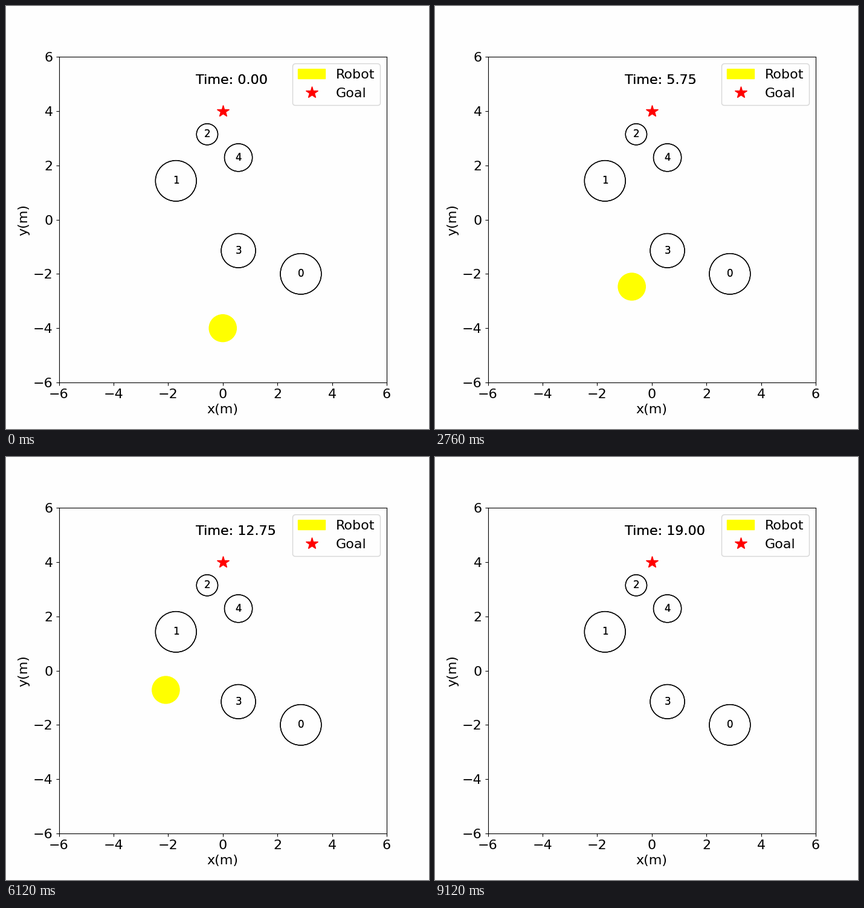
A matplotlib script that plays this animation: 700 px wide and 700 px high, repeating every 9240 ms.

```python
import numpy as np
import matplotlib.pyplot as plt
from matplotlib.animation import FuncAnimation
from matplotlib.lines import Line2D

FRAMES = 77
INTERVAL = 120      # ms per frame
DT = 0.25           # simulated seconds per frame
CELL = 1 / 7        # obstacle centres lie on this grid (m)

# column, row, size class
OBSTACLES = [(20, -14, 3), (-12, 10, 3), (-4, 22, 0), (4, -8, 2), (4, 16, 1)]

# key points of the drive: step, x, y
KEYS = [(0, 0, -4), (8, -0.32, -3.44), (16, -0.71, -2.86),
        (24, -0.735, -2.42), (32, -0.8, -2.06), (43, -1.28, -1.21),
        (48, -1.62, -1.2), (57, -3.64, 1.28), (64, -6.65, 2.75)]


def ease_through(t, p, at):
    """Cubic Hermite curve with harmonic-mean slopes, so it never overshoots."""
    h = np.diff(t)
    d = np.diff(p) / h
    a, b = d[:-1], d[1:]
    inner = np.where(a * b > 0, 2 * a * b / (a + b), 0)
    m = np.concatenate([d[:1], inner, d[-1:]])
    at = np.clip(at, t[0], t[-1])
    k = np.clip(np.searchsorted(t, at, side="right") - 1, 0, len(h) - 1)
    s = (at - t[k]) / h[k]
    blend = s * s * (3 - 2 * s)
    return (p[k] + (p[k + 1] - p[k]) * blend
            + h[k] * s * (1 - s) * (m[k] * (1 - s) - m[k + 1] * s))


def twice(draw):
    """Two stacked copies give the heavier strokes."""
    return [draw(), draw()]


def write(x, y, label, size):
    return twice(lambda: ax.text(x, y, label, color="black", fontsize=size))


def ring(x, y, r):
    return twice(lambda: ax.add_artist(plt.Circle((x, y), r, fill=False)))


steps = np.arange(FRAMES)
when, *axes_keys = np.array(KEYS, dtype=float).T
path = np.column_stack([ease_through(when, p, steps) for p in axes_keys])

plt.rcParams.update({
    "font.family": "DejaVu Sans",
    "text.hinting": "force_autohint",
    "text.hinting_factor": 8,
    "figure.facecolor": "#fefefe",
    "axes.facecolor": "#fefefe",
})
fig, ax = plt.subplots(figsize=(7, 7), dpi=100)
ax.set_xlim(-6, 6)
ax.set_ylim(-6, 6)
ax.tick_params(labelsize=16)
ax.set_xlabel("x(m)", fontsize=16)
ax.set_ylabel("y(m)", fontsize=16)

robot = plt.Circle(path[0], 0.5, fill=True, color="yellow")
goal = Line2D([0], [4], color="red", marker="*", linestyle="None", markersize=15)
ax.add_artist(robot)
ax.add_artist(goal)
ax.legend([robot, goal], ["Robot", "Goal"], fontsize=16, loc="upper right")

for i, (col, row, size) in enumerate(OBSTACLES):
    x, y = col * CELL, row * CELL
    ring(x, y, 0.39 + 0.12 * size)
    write(x - 0.11, y - 0.11, str(i), 12)

clock = write(-1, 5, "Time: 0.00", 16)


def update(step):
    robot.center = path[step]
    for label in clock:
        label.set_text(f"Time: {step * DT:.2f}")
    return [robot, *clock]


anim = FuncAnimation(fig, update, frames=FRAMES, interval=INTERVAL,
                     repeat=True, repeat_delay=0, blit=False)
plt.show()
```
